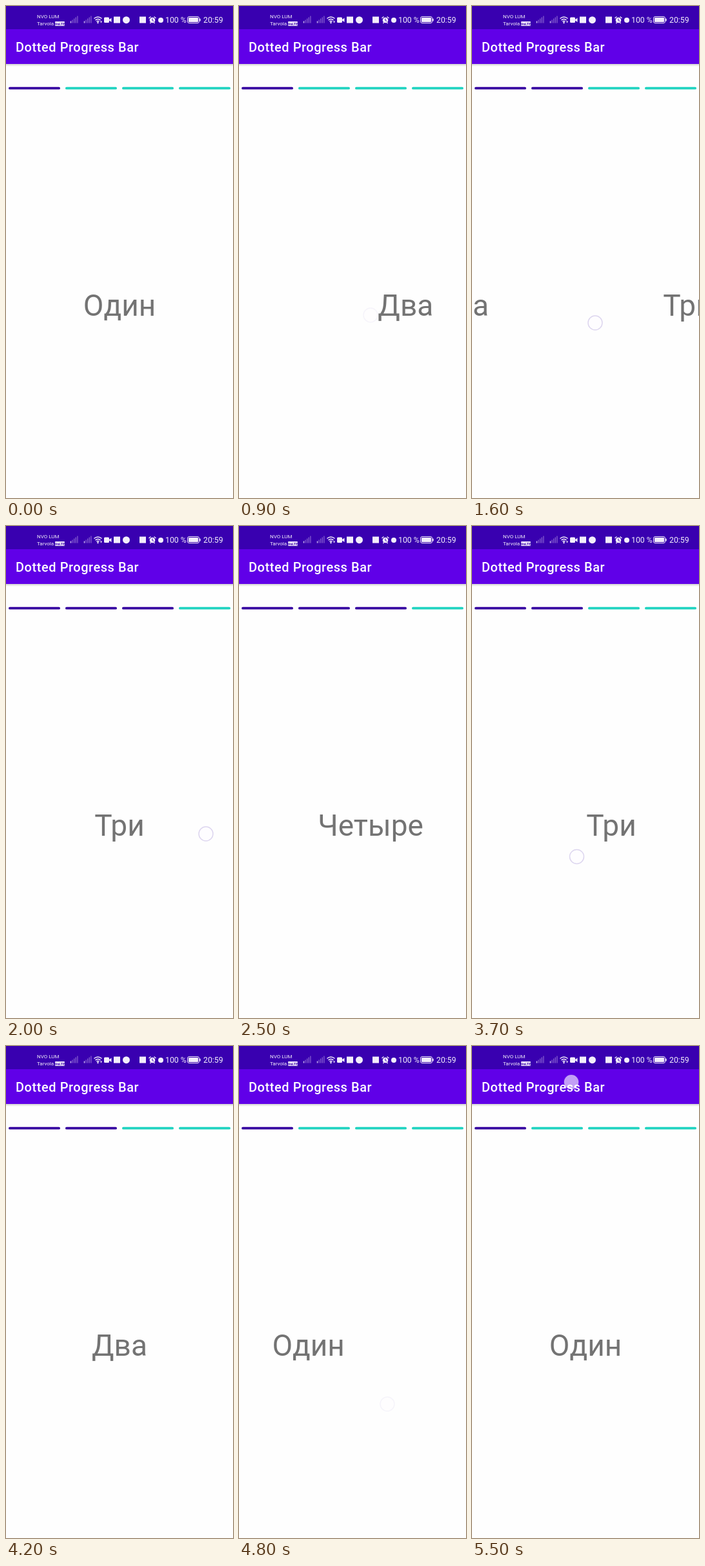
An HTML page that plays this animation: 352 by 764 pixels, repeating every 5600 ms.

```html
<!DOCTYPE html>
<html lang="ru">
<head>
<meta charset="utf-8">
<title>Dotted Progress Bar</title>
<style>
  html, body { margin: 0; width: 100%; height: 100%; overflow: hidden; background: #fefefe; }
  svg { display: block; width: 100%; height: 100%; font-family: Roboto, sans-serif; }
  .status { fill: #f3eefb; }
  .line { fill: none; stroke: #f3eefb; }
  .word { font-size: 46px; fill: #737373; text-anchor: middle; }
</style>
</head>
<body>
<svg viewBox="0 0 352 764">
  <defs>
    <linearGradient id="shadow" x2="0" y2="1">
      <stop stop-color="#000" stop-opacity=".18"/>
      <stop offset="1" stop-color="#000" stop-opacity="0"/>
    </linearGradient>
    <g id="signal">
      <path d="M1 11v-3" stroke="#d9c9f5" stroke-width="1.3"/>
      <path d="M3.6 11v-5M6.2 11v-7M8.8 11v-9M11.4 11v-11" stroke="#8760cf" stroke-width="1.3"/>
    </g>
  </defs>

  <rect y="90" width="352" height="4" fill="url(#shadow)"/>
  <rect width="352" height="90" fill="#6000e8"/>
  <rect width="352" height="36" fill="#3900b0"/>
  <text x="15" y="71" font-size="20" font-weight="500" letter-spacing=".55" fill="#fff">Dotted Progress Bar</text>

  <g class="status">
    <g font-size="8">
      <text x="48" y="19">NVO LUM</text>
      <text x="48" y="30">Tarvola</text>
    </g>
    <rect x="76" y="24" width="15" height="7" rx="1"/>
    <text x="83.5" y="29.8" font-size="5.5" font-weight="700" text-anchor="middle" fill="#3900b0">VoLTE</text>
    <use href="#signal" x="99.500" y="15.500"/>
    <use href="#signal" x="120.500" y="15.500"/>
    <path class="line" stroke-width="1.5" d="M136.500 19.500q6 -5 12 0M138.500 22q4 -3.500 8 0M140.500 24.300q2 -1.800 4 0"/>
    <circle cx="142.500" cy="26" r="1.200"/>
    <path d="M146 23.500h3l-1.500 3z"/>
    <rect x="152" y="17.500" width="8" height="8.500" rx="1.500"/>
    <path d="M160 21l3.500 -2.500v6.500l-3.500 -2.500z"/>
    <rect x="167" y="16.500" width="10" height="10"/>
    <circle cx="186.500" cy="21.700" r="5.500"/>
    <rect x="207" y="16.500" width="10" height="10"/>
    <circle cx="227" cy="22" r="4.300"/>
    <path class="line" stroke-width="1.400" d="M221.500 19l3 -2.500M232.500 19l-3 -2.500M223.500 27l1 -1.500M230.500 27l-1 -1.500"/>
    <path d="M227 19.500v3l2 1" fill="none" stroke="#3900b0"/>
    <circle cx="240" cy="22" r="4"/>
    <text x="247" y="26.300" font-size="12.300">100 %</text>
    <rect class="line" x="281.500" y="16.500" width="18" height="10" rx="2.500"/>
    <rect x="283" y="18" width="15" height="7" rx="1"/>
    <rect x="300.300" y="19.500" width="1.500" height="4" rx=".5"/>
    <text x="306" y="26.300" font-size="12.300">20:59</text>
  </g>

  <g id="bars"></g>
  <g id="pages"></g>
  <circle id="touch" r="11"/>
</svg>

<script>
const LOOP = 5600, STEP = 100, WIDTH = 352;
const bars = document.getElementById('bars');
const pages = document.getElementById('pages');
const touch = document.getElementById('touch');

// drag: px moved at release; power: settle deceleration; path: finger x0, y0, x1, y1
const swipes = [
  { dir: 1, down: 700, start: 700, release: 800, end: 1100, drag: 111, power: 2.65, path: [284, 479, 204, 480] },
  { dir: 1, down: 1400, start: 1400, release: 1600, end: 2000, drag: 193, power: 3, path: [310, 482, 191, 492] },
  { dir: 1, down: 2000, start: 2100, release: 2300, end: 2700, drag: 87, power: 3.24, path: [310, 478, 205, 485] },
  { dir: -1, down: 2900, start: 2900, release: 3200, end: 3400, drag: 190, power: 3, path: [150, 473, 322, 521] },
  { dir: -1, down: 3600, start: 3600, release: 3800, end: 4200, drag: 160, power: 1.9, path: [90, 495, 235, 532] },
  { dir: -1, down: 4500, start: 4500, release: 4700, end: 5100, drag: 190, power: 3, path: [90, 500, 230, 556] }
];

function add(parent, tag, attrs, text = '') {
  const el = document.createElementNS('http://www.w3.org/2000/svg', tag);
  for (const name in attrs) el.setAttribute(name, attrs[name]);
  el.textContent = text;
  parent.append(el);
}

['Один', 'Два', 'Три', 'Четыре'].forEach((word, i) => {
  add(bars, 'rect', { x: 4 + 88 * i, y: 125.8, width: 80, height: 3.8, rx: 1.9 });
  add(pages, 'text', { class: 'word', x: 176 + WIDTH * i, y: 481 }, word);
});

const clamp = v => Math.min(1, Math.max(0, v));
const dragged = (s, t) => clamp((t - s.start) / (s.release - s.start));

function travel(s, t) {
  if (t <= s.release) return s.drag * dragged(s, t) ** 2;
  const rest = 1 - clamp((t - s.release) / (s.end - s.release));
  return WIDTH - (WIDTH - s.drag) * rest ** s.power;
}

function showTouch(x, y, opacity, fill, stroke) {
  touch.setAttribute('cx', x);
  touch.setAttribute('cy', y);
  touch.setAttribute('opacity', opacity);
  touch.setAttribute('fill', fill);
  touch.setAttribute('stroke', stroke);
  touch.setAttribute('stroke-width', 1.5);
}

function draw(t) {
  const offset = swipes.reduce((sum, s) => sum + s.dir * travel(s, t), 0);
  pages.setAttribute('transform', `translate(${-offset} 0)`);

  const current = Math.floor(offset / WIDTH + 1e-6);
  [...bars.children].forEach((bar, i) =>
    bar.setAttribute('fill', i <= current ? '#3500a0' : '#1fd3c0'));

  showTouch(0, 0, 0, 'none', 'none');
  const s = swipes.find(s => t >= s.down && t <= s.release + STEP);
  if (s) {
    const [x0, y0, x1, y1] = s.path, u = dragged(s, t);
    showTouch(x0 + (x1 - x0) * u, y0 + (y1 - y0) * u, t > s.release ? 0.25 : 1, '#fefdff', '#ddd6ef');
  }
  if (t >= 5500) showTouch(154, 56, 1, 'rgba(255,255,255,.62)', 'rgba(255,255,255,.2)');
}

function tick() {
  draw(Math.floor(performance.now() % LOOP / STEP) * STEP);
  requestAnimationFrame(tick);
}
tick();
</script>
</body>
</html>
```
